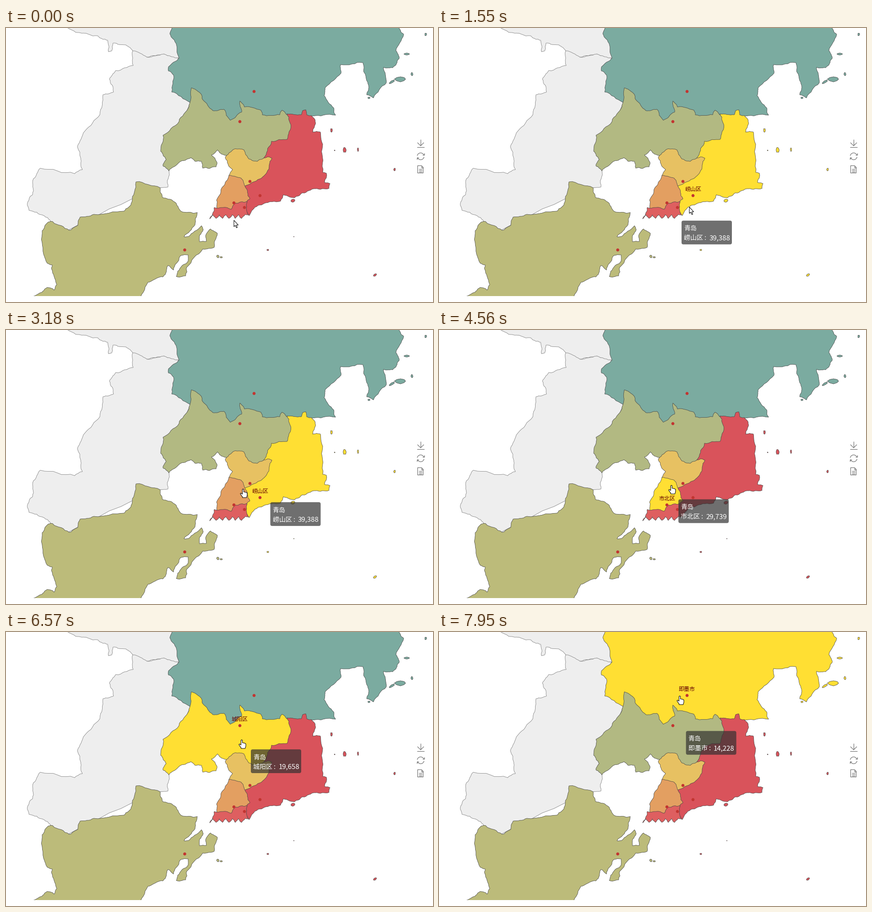
A matplotlib script that plays this animation: 933x600 px, repeating every 8 s.

```python
import matplotlib.pyplot as plt
import numpy as np
from matplotlib.animation import FuncAnimation
from matplotlib.patches import Circle, FancyBboxPatch, Polygon, Rectangle

W, H, LOOP, STEP = 933, 600, 8000, 50
HOVER = "#ffdf33"
PX = 0.72  # points per pixel at 100 dpi

plt.rcParams["font.family"] = "Noto Sans CJK JP"
plt.rcParams["toolbar"] = "None"
fig = plt.figure(figsize=(W / 100, H / 100), dpi=100, facecolor="white")
ax = fig.add_axes([0, 0, 1, 1])
ax.set(xlim=(0, W), ylim=(H, 0))
ax.axis("off")
rng = np.random.default_rng(4)
map_area = Rectangle((0, -5), W, 592, transform=ax.transData)


def rough(pts, passes=3):
    """Turn a few corners into a coastline by random midpoint displacement."""
    pts = np.array(pts, float)
    for _ in range(passes):
        out = []
        for a, b in zip(pts, np.roll(pts, -1, axis=0)):
            out.append(a)
            d = b - a
            size = np.hypot(*d)
            if size > 4:
                side = np.array([-d[1], d[0]]) / size
                out.append((a + b) / 2 + side * rng.uniform(-1, 1) * min(0.12 * size, 2.2))
        pts = np.array(out)
    return pts


def islet(x, y, w, h, tilt=0.0):
    a = np.arange(8) * np.pi / 4
    r = 1 + rng.uniform(-0.2, 0.2, 8)
    u, v = r * np.cos(a) * w / 2, r * np.sin(a) * h / 2
    c, s = np.cos(tilt), np.sin(tilt)
    return np.c_[x + u * c - v * s, y + u * s + v * c]


land = []


def region(color, corners, islets=(), edge="#444444"):
    parts = []
    for pts in [rough(corners)] + [islet(*i) for i in islets]:
        p = Polygon(pts, closed=True, fc=color, ec=edge, lw=0.55, joinstyle="round", zorder=1)
        ax.add_patch(p)
        p.set_clip_path(map_area)
        parts.append(p)
    land.extend(parts)
    return color, parts


# Each region runs on beneath the ones drawn after it.
region("#eeeeee", [(131, -4), (160, 10), (200, 17), (222, 27), (224, 52), (231, 50), (234, 33),
                   (262, 37), (277, 50), (308, 64), (345, 57), (378, 66), (385, -4)],
       edge="#777777")
region("#eeeeee", [(277, 50), (278, 82), (240, 93), (226, 112), (235, 140), (212, 146), (205, 190),
                   (172, 226), (156, 260), (167, 310), (150, 319), (75, 307), (60, 330), (58, 365),
                   (47, 383), (50, 399), (83, 411), (97, 422), (105, 455), (300, 365), (337, 350),
                   (354, 348), (356, 312), (403, 163), (370, 90), (378, 67), (345, 57), (308, 64)],
       edge="#777777")
region("#bcbb7a", [(337, 350), (284, 337), (275, 381), (258, 401), (192, 408), (162, 414),
                   (157, 432), (138, 443), (102, 424), (92, 425), (79, 444), (82, 495), (90, 515),
                   (101, 519), (104, 540), (111, 562), (105, 574), (90, 568), (74, 580), (40, 592),
                   (40, 598), (290, 600), (310, 557), (343, 545), (354, 520), (366, 530),
                   (380, 500), (398, 497), (398, 510), (375, 533), (372, 544), (392, 543),
                   (395, 524), (430, 484), (455, 480), (462, 450), (447, 440), (436, 456),
                   (438, 467), (423, 468), (423, 454), (431, 441), (427, 433), (398, 457),
                   (389, 457), (413, 431), (418, 404), (382, 401), (363, 377), (342, 371)],
       [(463, 500, 5, 6), (470, 502, 5, 3)])
jimo = region("#7baba0", [(365, -4), (358, 13), (369, 30), (378, 66), (355, 85), (355, 94),
                          (366, 103), (362, 140), (402, 163), (440, 195), (500, 215), (560, 205),
                          (615, 205), (669, 193), (720, 191), (716, 175), (695, 148), (698, 130),
                          (732, 99), (731, 80), (780, 76), (783, 98), (792, 125), (788, 146),
                          (803, 153), (831, 120), (825, 86), (845, 87), (859, 67), (852, 50),
                          (869, 14), (858, -4)],
              [(917, 14, 4, 6), (876, 57, 11, 4), (887, 101, 4, 7), (862, 112, 24, 11),
               (843, 118, 14, 4, -0.5), (793, 153, 5, 4)])
chengyang = region("#b2b982", [(402, 163), (405, 131), (423, 141), (430, 157), (452, 181),
                               (476, 178), (490, 202), (515, 184), (511, 160), (521, 173),
                               (557, 180), (560, 190), (598, 190), (603, 180), (617, 192),
                               (640, 220), (590, 270), (560, 300), (500, 292), (474, 277),
                               (462, 267), (449, 278), (461, 294), (459, 304), (430, 307),
                               (427, 292), (413, 292), (404, 284), (380, 293), (356, 313),
                               (343, 302), (350, 288), (338, 270), (343, 235), (378, 205),
                               (400, 172)])
laoshan = region("#d9535b", [(655, 179), (648, 181), (645, 190), (614, 188), (622, 220),
                             (614, 244), (580, 248), (566, 281), (535, 325), (516, 352),
                             (518, 375), (515, 390), (526, 403), (531, 411), (537, 400),
                             (552, 388), (575, 381), (600, 379), (606, 365), (630, 372),
                             (648, 361), (676, 352), (706, 351), (708, 341), (696, 338),
                             (700, 318), (692, 316), (691, 264), (687, 228), (670, 228),
                             (676, 206), (668, 192), (657, 190)],
                 [(711, 224, 4, 8), (740, 267, 6, 12), (769, 266, 3, 8), (718, 268, 2, 2),
                  (849, 310, 4, 7), (627, 378, 9, 6), (572, 486, 4, 3), (629, 457, 1, 1),
                  (806, 541, 9, 4, -0.6)])
licang = region("#e7c162", [(479, 284), (499, 265), (520, 267), (531, 287), (549, 292), (572, 282),
                            (581, 285), (570, 316), (550, 332), (522, 346), (490, 335), (487, 323),
                            (495, 310)])
shibei = region("#e39f61", [(487, 323), (514, 329), (522, 346), (533, 374), (520, 386), (490, 403),
                            (460, 396), (460, 377), (474, 347)])
teeth = [(522 - 7 * k, 409 + 8 * (k % 2)) for k in range(11)]
shinan = region("#de5f60", [(500, 384), (527, 380), (525, 395), (530, 409), *teeth, (445, 418),
                            (453, 403), (455, 393), (492, 397)])

# name: map parts, marker position, value
places = {
    "市南区": (shinan, 521, 393, "36,812"), "崂山区": (laoshan, 555, 367, "39,388"),
    "市北区": (shibei, 498, 383, "29,739"), "李沧区": (licang, 533, 336, "25,606"),
    "城阳区": (chengyang, 511, 205, "19,658"), "即墨市": (jimo, 542, 139, "14,228"),
}
for x, y in [p[1:3] for p in places.values()] + [(390.5, 486)]:
    ax.add_patch(Circle((x, y), 3.3, fc="#c23531", ec="none", zorder=8))


def line(xs, ys):
    ax.plot(xs, ys, color="#666666", lw=0.8, zorder=8, solid_capstyle="butt")


# toolbox: download, refresh, data view
line([906, 906], [244, 257])
line([899, 906, 913], [251, 258, 251])
line([898, 914], [260.5, 260.5])
for turn in (1, -1):
    a = np.radians(np.linspace(10, 160, 20))
    line(906 - turn * 7.5 * np.cos(a), 281 - turn * 7.5 * np.sin(a))
    line(906 + turn * np.array([4, 8, 8]), 281 - turn * np.array([3, 3, 7]))
line([899.5, 908, 911.5, 911.5, 899.5, 899.5], [301.5, 301.5, 305, 317.5, 317.5, 301.5])
line([907.5, 907.5, 911.5], [301.5, 305.5, 305.5])
for y in (308.5, 311.5, 314.5):
    line([902, 909], [y, y])


def words(size, color, z, ha="left"):
    return ax.text(0, 0, "", fontsize=size * PX, color=color, zorder=z, ha=ha,
                   va="center_baseline")


label = words(12, "#640000", 9, "center")
box = FancyBboxPatch((0, 0), 110, 52, boxstyle="round,pad=0,rounding_size=4",
                     fc=(0.196, 0.196, 0.196, 0.7), ec="none", zorder=10)
ax.add_patch(box)
title = words(14, "white", 11)
key = words(14, "white", 11)
value = words(15, "white", 11, "right")
title.set_text("青岛")

ARROW = np.array([(0, 0), (0, 14), (3, 11.3), (5.5, 16.5), (7.5, 15.7), (5.3, 10.6), (9.5, 10.5)])
HAND = np.array([(-1.5, 1), (0, 0), (1.5, 1), (1.5, 6.5), (6.6, 7.4), (9, 9), (9, 14), (7.5, 19),
                 (-1.5, 19), (-1.5, 17), (-5, 12.5), (-6, 10), (-4.5, 9.2), (-1.5, 11.5)])
cursor = Polygon(ARROW, closed=True, fc="white", ec="black", lw=0.75, zorder=12)
ax.add_patch(cursor)

# time, x, y of the pointer wherever it turns or rests
TRACK = np.array([(-100, 630, 380), (0, 498, 421), (70, 498, 421), (270, 505, 402),
                  (1400, 505, 402), (1550, 547, 392), (1750, 567, 358), (2950, 567, 358),
                  (3150, 518, 348), (3350, 503, 350), (4470, 503, 350), (4750, 520, 315),
                  (5700, 520, 315), (5950, 520, 274), (6150, 515, 236), (7650, 515, 236),
                  (7900, 526, 140)]).T
SWITCH = dict(zip(places, (100, 1500, 3250, 4650, 6050, 7700)))
LAG = np.linspace(50, 350, 31)


def pointer(t):
    return np.array([np.interp(t, TRACK[0], c) for c in TRACK[1:]])


def draw(i):
    t = i * STEP
    active = None
    for name, ((color, parts), *_) in places.items():
        if t >= SWITCH[name]:
            active = name
        for p in parts:
            p.set_facecolor(color)

    for artist in (box, title, key, value, label):
        artist.set_visible(active is not None)
    if active:
        (_, parts), px, py, number = places[active]
        for p in parts:
            p.set_facecolor(HOVER)
        label.set_text(active)
        label.set_position((px, py - 15))
        # the tooltip trails the pointer: an average of its recent places
        x, y = pointer(t - LAG).mean(axis=1) + (20, 21)
        box.set_x(x)
        box.set_y(y)
        title.set_position((x + 5, y + 16))
        key.set_text(active + " :")
        key.set_position((x + 5, y + 37))
        value.set_text(number)
        value.set_position((x + 106, y + 37))

    x, y = pointer(t)
    on_land = any(p.get_path().contains_point((x, y + 3)) for p in land)
    cursor.set_xy((HAND if on_land else ARROW) + (x, y))
    return ()


anim = FuncAnimation(fig, draw, frames=LOOP // STEP, interval=STEP, repeat=True,
                     repeat_delay=0, blit=False)
plt.show()
```
